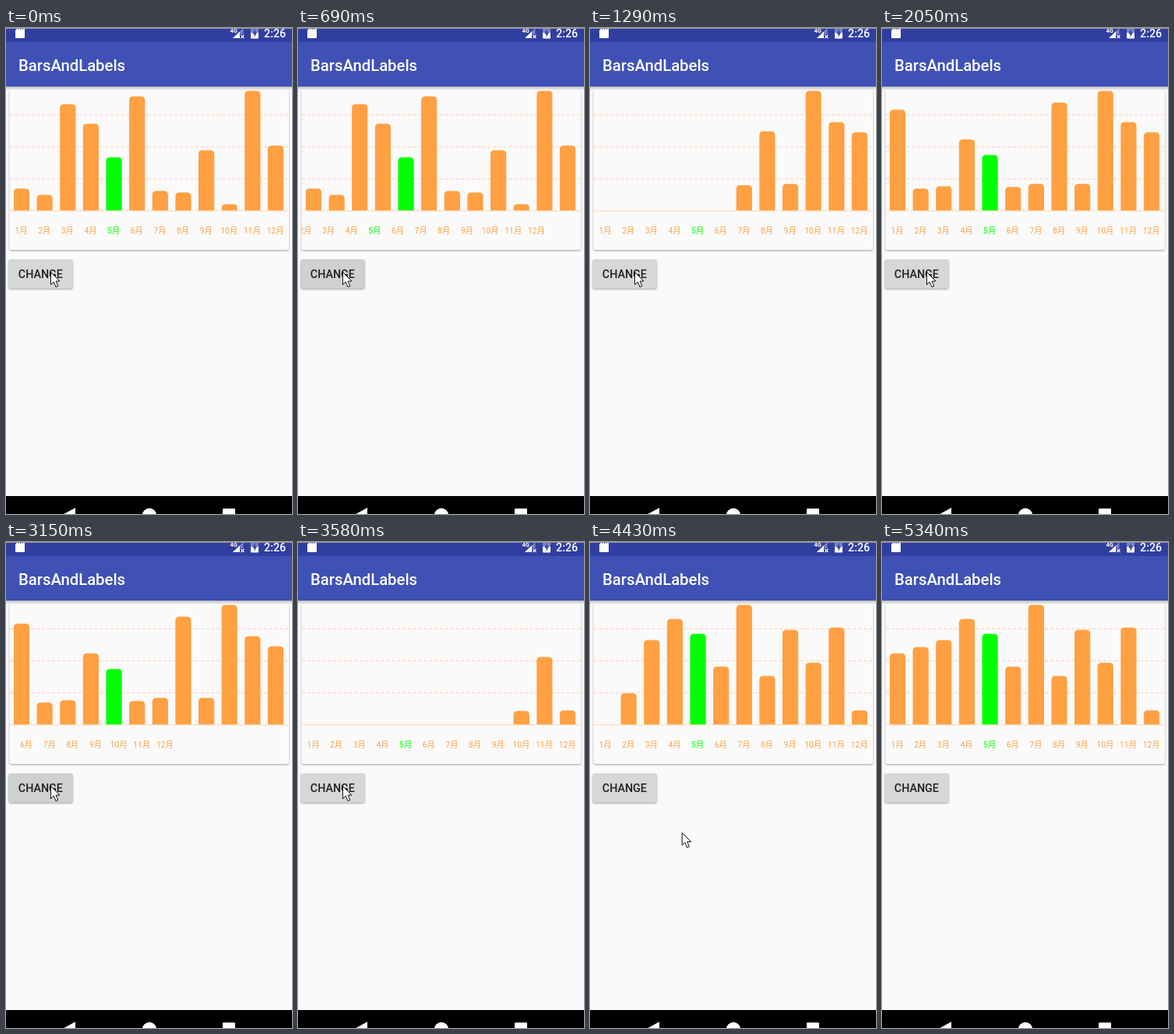
Write an HTML page that moves like this. It is 367 by 622 pixels and loops after 5770 ms.

```html
<!DOCTYPE html>
<html lang="zh">
<head>
<meta charset="utf-8">
<title>Bar chart</title>
<style>
html, body { margin: 0; width: 100%; height: 100%; overflow: hidden; background: #fafafa; }
svg { display: block; width: 367px; height: 622px; }
text { font-family: Roboto, "Noto Sans CJK SC", "Noto Sans CJK JP", "Noto Sans CJK", sans-serif; }
.label { font-size: 10.3px; text-anchor: middle; }
.title { font-size: 20.3px; font-weight: 500; fill: #fff; }
.clock { font-size: 14.3px; font-weight: 500; fill: #fff; }
.button { font-size: 14.3px; font-weight: 500; fill: #202020; }
</style>
</head>
<body>
<svg viewBox="0 0 367 622" xmlns="http://www.w3.org/2000/svg">
  <defs>
    <linearGradient id="shade" x2="0" y2="1">
      <stop offset="0" stop-color="#000" stop-opacity=".24"/>
      <stop offset="1" stop-color="#000" stop-opacity="0"/>
    </linearGradient>
    <filter id="soft" x="-5%" y="-20%" width="110%" height="140%"><feGaussianBlur stdDeviation="1"/></filter>
    <clipPath id="card"><rect x="4.5" y="79" width="358.5" height="205"/></clipPath>
  </defs>
  <rect width="367" height="622" fill="#fafafa"/>

  <rect x="4.5" y="80" width="358.5" height="205" rx="2" opacity=".36" filter="url(#soft)"/>
  <rect x="4.5" y="78" width="358.5" height="206" rx="2" fill="#fafafa"/>
  <rect y="75" width="367" height="5" fill="url(#shade)"/>

  <rect width="367" height="18" fill="#303f9f"/>
  <rect y="18" width="367" height="57" fill="#3f51b5"/>
  <text class="title" x="16" y="54.5">BarsAndLabels</text>

  <g fill="#fff">
    <path d="M12 3L15 0H23Q24 0 24 1V12Q24 13 23 13H13Q12 13 12 12Z"/>
    <path d="M16 0V2M18.5 0V2M21 0V2" stroke="#303f9f"/>
    <text x="287.5" y="5.5" font-size="7.5" font-weight="700">4G</text>
    <path d="M291 13L304.5 0V8H300V13Z" opacity=".35"/>
    <path d="M291 13L300 4.5V13Z"/>
    <path d="M301.5 9L305.5 13M305.5 9L301.5 13" stroke="#fff" stroke-width="1.2"/>
    <path d="M314 0H324V6H314Z" opacity=".35"/>
    <path d="M314 6H324V12.5Q324 13.5 323 13.5H315Q314 13.5 314 12.5Z"/>
    <path d="M319.8 1L316.3 7.5H318.6V12L322 5.8H319.8Z" fill="#303f9f"/>
    <text class="clock" x="331" y="12">2:26</text>
  </g>
  <rect width="367" height="1" fill="#9a9a9a"/>

  <g clip-path="url(#card)">
    <path d="M5 111H363M5 152H363M5 193H363" stroke="#ffcab2" stroke-width="1.2" stroke-dasharray="4 2.8"/>
    <path d="M5 234H363" stroke="#ffd6b0" stroke-width="1.2"/>
    <g id="bars"></g>
    <g id="labels"></g>
  </g>

  <rect x="3.5" y="297.5" width="82" height="37" rx="2" opacity=".36" filter="url(#soft)"/>
  <rect id="face" x="3.5" y="296" width="82" height="37.5" rx="2"/>
  <text class="button" x="15.8" y="320">CHANGE</text>

  <rect y="599" width="367" height="23"/>
  <g fill="#fff">
    <path d="M89 614V632L72.5 623Z"/>
    <circle cx="184" cy="623.5" r="9"/>
    <rect x="278" y="615" width="16" height="16" rx="1"/>
  </g>
  <path id="cursor" d="M.5 .5V16.5L4.3 13L7 19.5L9.8 18.3L7.1 12H12Z" fill="#fff" stroke="#111"/>
</svg>
<script>
const NS = "http://www.w3.org/2000/svg";
const $ = id => document.getElementById(id);
const LOOP = 5770, BASE = 233.6, GAP = 29.64, BAR = 20.2;
const SLIDE = 0.75, GROW = 0.7, LAG = 69; // px per ms, px per ms, px between bars
const LEAVE = 3970, GONE = 5340;

// The screen refreshes in even steps of about FRAME ms between these moments
const BEATS = [0, 270, 690, 1290, 2050, 2760, 3150, LEAVE, GONE, LOOP];
const FRAME = 137;

// Each press slides the months in until `land`, then grows new bars from the right
const RUNS = [
  { press: -LOOP, land: -LOOP, grow: -LOOP,
    values: [28, 20, 136, 111, 68, 146, 25, 23, 77, 8, 153, 83] },
  { press: 270, land: 743, grow: 751,
    values: [129, 28, 31, 91, 71, 30, 34, 138, 34, 153, 113, 100] },
  { press: 2760, land: 3339, grow: 3338,
    values: [91, 99, 108, 135, 116, 74, 153, 62, 121, 79, 124, 18] }
];

function add(parent, tag, attrs) {
  const el = document.createElementNS(NS, tag);
  for (const key in attrs) el.setAttribute(key, attrs[key]);
  return parent.appendChild(el);
}

const bars = RUNS[0].values.map((_, i) => {
  const fill = i === 4 ? "#00ff00" : "#ffa042";
  add($("labels"), "text", { class: "label", x: 19.6 + GAP * i, y: 263, fill }).textContent = `${i + 1}月`;
  return add($("bars"), "path", { fill });
});

function barPath(i, h) {
  if (h <= 0) return "";
  const r = Math.min(5, h);
  return `M${9.9 + GAP * i} ${BASE}v${r - h}q0 ${-r} 5 ${-r}h${BAR - 10}q5 0 5 ${r}V${BASE}Z`;
}

function snap(time) {
  const k = BEATS.findIndex(b => b > time);
  const from = BEATS[k - 1], span = BEATS[k] - from;
  const step = span / Math.round(span / FRAME);
  return from + step * Math.floor((time - from) / step);
}

// Slow start, then a steady, slightly bowed run off the bottom edge
function pointer(t) {
  const u = Math.min(1, Math.max(0, (t - LEAVE) / (GONE - LEAVE)));
  const f = u * (1 - 1.15 * (1 - u) ** 3);
  return [57 + 268 * f * (1.3 - 0.3 * f), 312 + 328 * f];
}

function draw(time) {
  const t = snap(time);
  const latest = key => RUNS.filter(r => r[key] <= t).pop();
  const slide = latest("press"), run = latest("grow");
  const reach = GROW * (t - run.grow);

  $("labels").setAttribute("transform", `translate(${Math.min(0, SLIDE * (t - slide.land))})`);
  bars.forEach((bar, i) => {
    bar.setAttribute("d", barPath(i, Math.min(run.values[i], reach - LAG * (11 - i))));
  });
  $("face").setAttribute("fill", t < slide.land ? "#cfd0d0" : "#d6d7d7");
  $("cursor").setAttribute("transform", `translate(${pointer(t)})`);
}

const start = performance.now();
function tick() {
  draw((performance.now() - start) % LOOP);
  requestAnimationFrame(tick);
}
tick();
</script>
</body>
</html>
```
